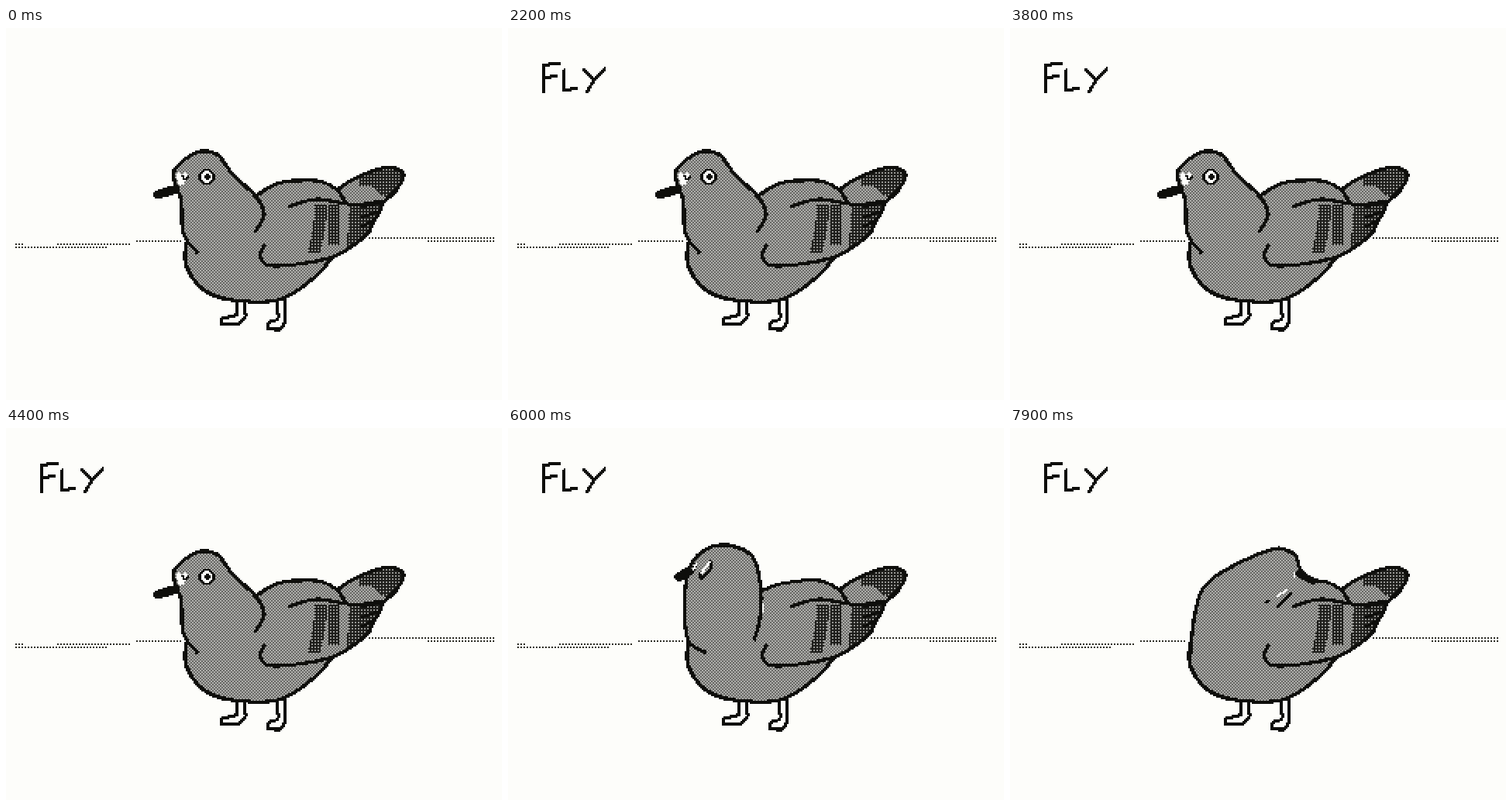
An HTML page with a canvas for the animation above (8 s loop, 640 by 480 pixels).

```html
<!DOCTYPE html>
<html lang="en">
<head>
<meta charset="utf-8">
<title>Pigeon</title>
<style>
html, body { margin: 0; width: 100%; height: 100%; overflow: hidden; background: #fdfdfa; }
canvas { display: block; width: 640px; height: 480px; }
</style>
</head>
<body>
<canvas id="stage" width="640" height="480" role="img" aria-label="A pigeon and the word FLY"></canvas>
<script>
// The art lives on a half-size pixel grid; all paths use stage units.
const SCALE = 2, W = 640 / SCALE, H = 480 / SCALE, LOOP = 8000, LINE = 4.5;

// Tones give the brightness of a grid pixel
const ink = () => 14;
const paper = () => 253;
const grey = (x, y) => (x + y) & 1 ? 174 : 104;
const dark = (x, y) => x & y & 1 ? 150 : 30;

// Wing: two leaning bars, dark flight feathers and a dark tail tip
function plumage(gx, gy) {
  const x = gx * SCALE, y = gy * SCALE, drop = y - 226;
  const bar = drop > 0 && drop < 64 && Math.abs(x - 405 + drop * drop / 450) < 8;
  const shortBar = drop > 0 && drop < 54 && Math.abs(x - 422) < 7;
  const flight = drop > 0 && drop < 56 && x > 443 - drop / 12;
  const tip = x > 455 && y < 203 + Math.max(0, x - 470) * 0.8;
  return (bar || shortBar || flight || tip ? dark : grey)(gx, gy);
}

function makeGrid() {
  const c = document.createElement('canvas');
  c.width = W;
  c.height = H;
  return c.getContext('2d', { willReadFrequently: true });
}

const scratch = makeGrid();
scratch.lineCap = scratch.lineJoin = 'round';

// Path through the points: round = 1 is a Catmull-Rom curve, 0 straight lines
function through(text, round = 1) {
  const p = text.trim().split(/\s+/).map(s => s.split(',').map(Number));
  const path = new Path2D();
  path.moveTo(...p[0]);
  for (let i = 0; i < p.length - 1; i++) {
    const a = p[i - 1] || p[i], b = p[i], c = p[i + 1], d = p[i + 2] || c, k = round / 6;
    path.bezierCurveTo(
      b[0] + (c[0] - a[0]) * k, b[1] + (c[1] - a[1]) * k,
      c[0] - (d[0] - b[0]) * k, c[1] - (d[1] - b[1]) * k, ...c);
  }
  return path;
}

function disc(x, y, r) {
  const path = new Path2D();
  path.arc(x, y, r, 0, 7);
  return path;
}

// Hard-edged painting: each grid pixel is either on or off
function paint(ctx, path, tone, width = 0) {
  scratch.setTransform(1, 0, 0, 1, 0, 0);
  scratch.clearRect(0, 0, W, H);
  scratch.scale(1 / SCALE, 1 / SCALE);
  scratch.lineWidth = width;
  width ? scratch.stroke(path) : scratch.fill(path);
  const mask = scratch.getImageData(0, 0, W, H).data;
  const out = ctx.getImageData(0, 0, W, H);
  for (let i = 0; i < W * H; i++) {
    if (mask[i * 4 + 3] < 120) continue;
    const v = tone(i % W, i / W | 0);
    out.data.set([v, v, v - 3, 255], i * 4);
  }
  ctx.putImageData(out, 0, 0);
}

const line = (ctx, text, width = LINE, tone = ink) => paint(ctx, through(text), tone, width);

const body = '232,278 233,308 258,340 300,352 355,350 400,320 420,297';
const bodyTop = ' 400,270 390,230 320,240 250,250';
const back = '392,196 412,200 427,209 437,223';
const tail = `429,208 450,194 490,180 513,188 503,210 487,225 482,238 474,250
  464,268 420,296 345,307 328,295 333,281`;
const wingLine = '366,230 400,221 450,228 488,223';
const legs = [
  '298,352 298,370 279,375 278,382 299,382 309,373 308,352',
  '350,348 351,375 339,380 338,388 354,389 360,379 360,347'
];

const poses = {
  front: {
    head: `247,290 229,265 226,222 218,200 218,182 245,161 272,163 292,188
      322,217 333,240 322,262`,
    back: '322,217 352,200 ' + back,
    face(ctx) {
      line(ctx, '196,215 219,208', 11);
      line(ctx, '223,190 226,200 231,190', 7, paper);
      line(ctx, '228,190 231,196 235,191', 2.5);
      paint(ctx, disc(259, 192, 10.5), ink);
      paint(ctx, disc(259, 192, 7.5), paper);
      paint(ctx, disc(260, 192, 4), ink);
    }
  },
  turned: {
    head: `254,289 232,273 228,215 239,171 273,151 314,164 326,205 325,245 318,273`,
    back: '328,210 352,201 ' + back,
    face(ctx) {
      line(ctx, '221,192 231,186', 12);
      line(ctx, '261,172 261,182 250,194 248,188', 4);
      line(ctx, '260,173 250,187', 3, paper);
      line(ctx, '243,175 237,188', 4);
      line(ctx, '243,175 239,183', 3, paper);
    }
  },
  preening: {
    head: '232,300 239,238 258,197 333,158 366,162 375,184 ' + back,
    back: '375,184 ' + back,
    face(ctx) {
      line(ctx, '371,187 376,192 391,199', 6);
      line(ctx, '330,224 335,223', 3);
      line(ctx, '346,231 362,213', 4);
      line(ctx, '346,217 356,209', 3, paper);
      line(ctx, '367,187 367,192', 3, paper);
    }
  }
};

// Dotted horizon: dashes on four rows
const horizon = [[[468, 630]], [[168, 226], [545, 630]], [[12, 22], [67, 162]], [[12, 130]]];

function drawHorizon(ctx) {
  ctx.fillStyle = '#2c2c24';
  horizon.forEach((dashes, row) => dashes.forEach(([from, to]) => {
    for (let x = from; x <= to; x += 4) ctx.fillRect(x >> 1, 135 + row * 2, 1, 1);
  }));
}

function drawPose(pose) {
  const ctx = makeGrid();
  ctx.fillStyle = '#fdfdfa';
  ctx.fillRect(0, 0, W, H);
  drawHorizon(ctx);
  for (const leg of legs) {
    paint(ctx, through(leg, 0.3), paper);
    paint(ctx, through(leg, 0.3), ink, 4);
  }
  paint(ctx, through(body + bodyTop), grey);
  paint(ctx, through(pose.head), grey);
  paint(ctx, through(pose.back + ' ' + tail), plumage);
  for (const part of [body, pose.head, pose.back, tail, wingLine]) line(ctx, part);
  for (let i = 0; i < 3; i++)
    line(ctx, `${487 - 6.5 * i},${225 + 11.5 * i} 459,${231 + 13 * i}`, 3.5);
  pose.face(ctx);
  return ctx.canvas;
}

function drawWord() {
  const ctx = makeGrid();
  const strokes = ['46,82 46,48 67,45', '47,64 62,62', '73,53 72,80 89,78',
    '98,54 111,68', '125,52 112,66 102,82'];
  for (const s of strokes) paint(ctx, through(s, 0), ink, 4);
  return ctx.canvas;
}

const pictures = {};
for (const name in poses) pictures[name] = drawPose(poses[name]);
const word = drawWord();

const WORD_AT = 1400;
const cues = [[0, 'front'], [5700, 'turned'], [6400, 'front'], [6800, 'turned'], [7500, 'preening']];

const stage = document.getElementById('stage').getContext('2d');
stage.imageSmoothingEnabled = false;
const start = performance.now();

function tick() {
  const t = Math.max(0, performance.now() - start) % LOOP;
  const pose = cues.filter(cue => cue[0] <= t).pop()[1];
  stage.drawImage(pictures[pose], 0, 0, 640, 480);
  if (t >= WORD_AT) stage.drawImage(word, 0, 0, 640, 480);
  requestAnimationFrame(tick);
}
tick();
</script>
</body>
</html>
```
